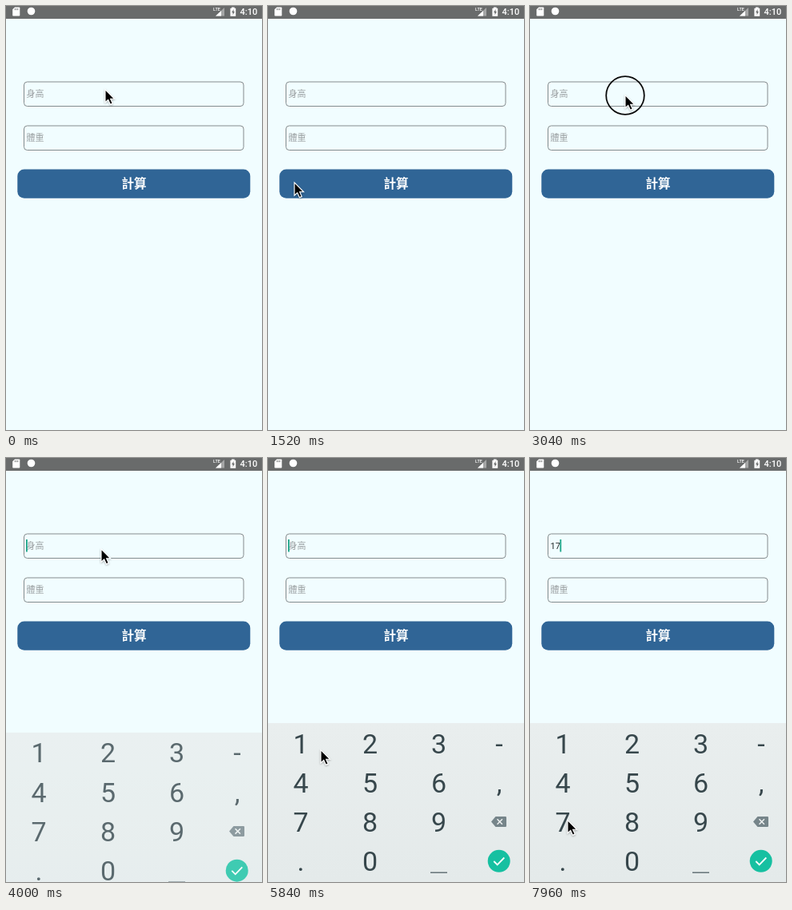
Write an HTML page that moves like this. It is 320 px wide and 531 px high and loops after 8 s.

```html
<!DOCTYPE html>
<html lang="zh-Hant">
<head>
<meta charset="utf-8">
<title>身高體重</title>
<style>
  html, body { margin: 0; width: 100%; height: 100%; overflow: hidden; background: #f1fdff; }
  svg { display: block; width: 100%; height: 100%; }
  text { font-family: Roboto, "Noto Sans CJK TC", "Noto Sans CJK", sans-serif; }
  .field { fill: none; stroke: #858b8d; }
  .hint { font-size: 11px; fill: #9a9fa1; }
  .value { font-size: 11px; fill: #222829; }
  .key { font-size: 34px; fill: #37474c; text-anchor: middle; }
</style>
</head>
<body>
<svg viewBox="0 0 320 531">
  <defs>
    <linearGradient id="board" x2="0" y2="1">
      <stop stop-color="#e9eeee"/><stop offset="1" stop-color="#e4eaea"/>
    </linearGradient>
    <filter id="shade" x="-50%" y="-50%" width="200%" height="200%">
      <feDropShadow dx="0" dy="1" stdDeviation="1" flood-opacity=".35"/>
    </filter>
  </defs>
  <rect width="320" height="531" fill="#f1fdff"/>

  <rect width="320" height="16" fill="#696b6b"/>
  <g fill="#fff">
    <path d="M11 1.5h5.5q.8 0 .8.8v9.4q0 .8-.8.8H9q-.8 0-.8-.8V4.3z"/>
    <path d="M11.2 3v2.2M13 3v2.2M14.8 3v2.2" stroke="#696b6b" stroke-width=".8"/>
    <circle cx="31.5" cy="6.5" r="4.8"/>
    <text x="259" y="6.2" font-size="5.5" font-weight="500">LTE</text>
    <path d="M273 2v10.5h-11z" opacity=".4"/>
    <path d="M269 6v6.5h-7z"/>
    <path d="M282 1.5h3.6v1.2h1.6v10h-6.8v-10h1.6z"/>
    <path d="M284.5 4l-2.4 4.2h1.5v3l2.3-4.2h-1.4z" fill="#696b6b"/>
    <text x="292.5" y="11" font-size="11" font-weight="500">4:10</text>
  </g>

  <rect class="field" x="22.5" y="95" width="274.5" height="30.5" rx="4"/>
  <rect class="field" x="22.5" y="150" width="274.5" height="30.5" rx="4"/>
  <text class="hint" id="hint" x="25.5" y="114">身高</text>
  <text class="hint" x="25.5" y="169">體重</text>
  <text class="value" id="value" x="25.5" y="114"></text>
  <rect id="caret" y="102" width="1.8" height="15.5" fill="#1ba588"/>
  <rect x="14.3" y="204.5" width="291" height="36.2" rx="8.5" fill="#306596"/>
  <text x="160" y="228.3" font-size="15.6" font-weight="700" fill="#fff" text-anchor="middle">計算</text>

  <g id="keyboard">
    <rect y="332" width="320" height="199" fill="url(#board)"/>
    <rect id="pressed" x="1" width="84" height="48" fill="#cdd5d7"/>
    <g id="keys"></g>
    <path d="M203 519.2h21" stroke="#5b696e" stroke-width="1.4"/>
    <path d="M284.5 449h12.3q1.2 0 1.2 1.2v10.6q0 1.2-1.2 1.2h-12.3l-5.5-6.5z" fill="#76858a"/>
    <path d="M286.5 452.3l6.4 6.4m0-6.4l-6.4 6.4" stroke="#eef1f1" stroke-width="1.5"/>
    <circle cx="288.7" cy="504.8" r="14" fill="#16c0a1"/>
    <path d="M282.3 505l4.4 4.4 8.6-8.9" fill="none" stroke="#fff" stroke-width="1.8"/>
  </g>

  <circle id="ring" r="23.8" fill="none" stroke="#0a0a0a" stroke-width="1.8"/>
  <path id="pointer" d="M0 0V16.2L3.7 12.8 6.4 18.8 9.2 17.6 6.6 11.8H11.6Z"
    fill="#000" stroke="#fff" stroke-width="1.1" filter="url(#shade)"/>
</svg>
<script>
const LOOP = 8000;
const $ = id => document.getElementById(id);

// Pointer stops: time, x, y
const STOPS = [
  [0, 124, 104.5], [80, 124, 104.5], [480, 34, 110], [880, 30, 158],
  [1080, 40, 163], [1440, 33, 221], [1740, 33, 221], [2220, 48, 116],
  [2600, 29, 147], [2940, 119, 111.5], [3200, 119, 111.5], [3360, 119, 114],
  [4440, 119, 114], [5200, 69, 361], [5840, 66, 365.5], [6080, 45, 361],
  [6400, 45, 361], [6720, 49, 383], [6900, 49, 383], [7440, 45, 453],
  [7720, 45, 453], [7900, 47, 453.5], [LOOP, 47, 453.5]
];
const CLICKS = [[2960, 3240], [6120, 6320], [7560, 7760]];
const PRESSES = [[6240, 6400, 334], [7720, 7900, 432]];
const FOCUS = 3560, FIRST = 6320, SECOND = 7800, SLIDE = 3880, SLIDE_MS = 240;

['123-', '456,', '789', '.0'].forEach((row, r) => [...row].forEach((char, c) => {
  const key = document.createElementNS('http://www.w3.org/2000/svg', 'text');
  key.setAttribute('class', 'key');
  key.setAttribute('x', [41, 127.5, 213.5, 289][c]);
  key.setAttribute('y', 369.5 + r * 49.2);
  key.textContent = char;
  $('keys').append(key);
}));

const active = (spans, t) => spans.find(([from, to]) => t >= from && t < to);
const show = (id, on) => $(id).setAttribute('visibility', on ? 'visible' : 'hidden');
const move = (id, x, y) => $(id).setAttribute('transform', `translate(${x} ${y})`);

function pointerAt(t) {
  const i = STOPS.findIndex(stop => stop[0] > t);
  const [t0, x0, y0] = STOPS[i - 1], [t1, x1, y1] = STOPS[i];
  const p = (t - t0) / (t1 - t0), e = p * p * (3 - 2 * p);
  return [x0 + (x1 - x0) * e, y0 + (y1 - y0) * e];
}

function draw(t) {
  const [x, y] = pointerAt(t);
  move('pointer', x, y);
  move('ring', x, y + .5);
  show('ring', active(CLICKS, t));

  const typed = t >= SECOND ? '17' : t >= FIRST ? '1' : '';
  $('value').textContent = typed;
  show('hint', !typed);
  $('caret').setAttribute('x', 25 + typed.length * 6.2);
  show('caret', t >= FOCUS && (typed || (t - FOCUS) % 1000 < 500));

  const p = Math.max(0, Math.min(1, (t - SLIDE) / SLIDE_MS));
  $('keyboard').setAttribute('opacity', Math.min(1, p * 1.6));
  move('keyboard', 0, 24 * (1 - p));
  const press = active(PRESSES, t);
  show('pressed', press);
  if (press) $('pressed').setAttribute('y', press[2]);
}

const start = performance.now();
function tick() {
  draw((performance.now() - start) % LOOP);
  requestAnimationFrame(tick);
}
tick();
</script>
</body>
</html>
```
